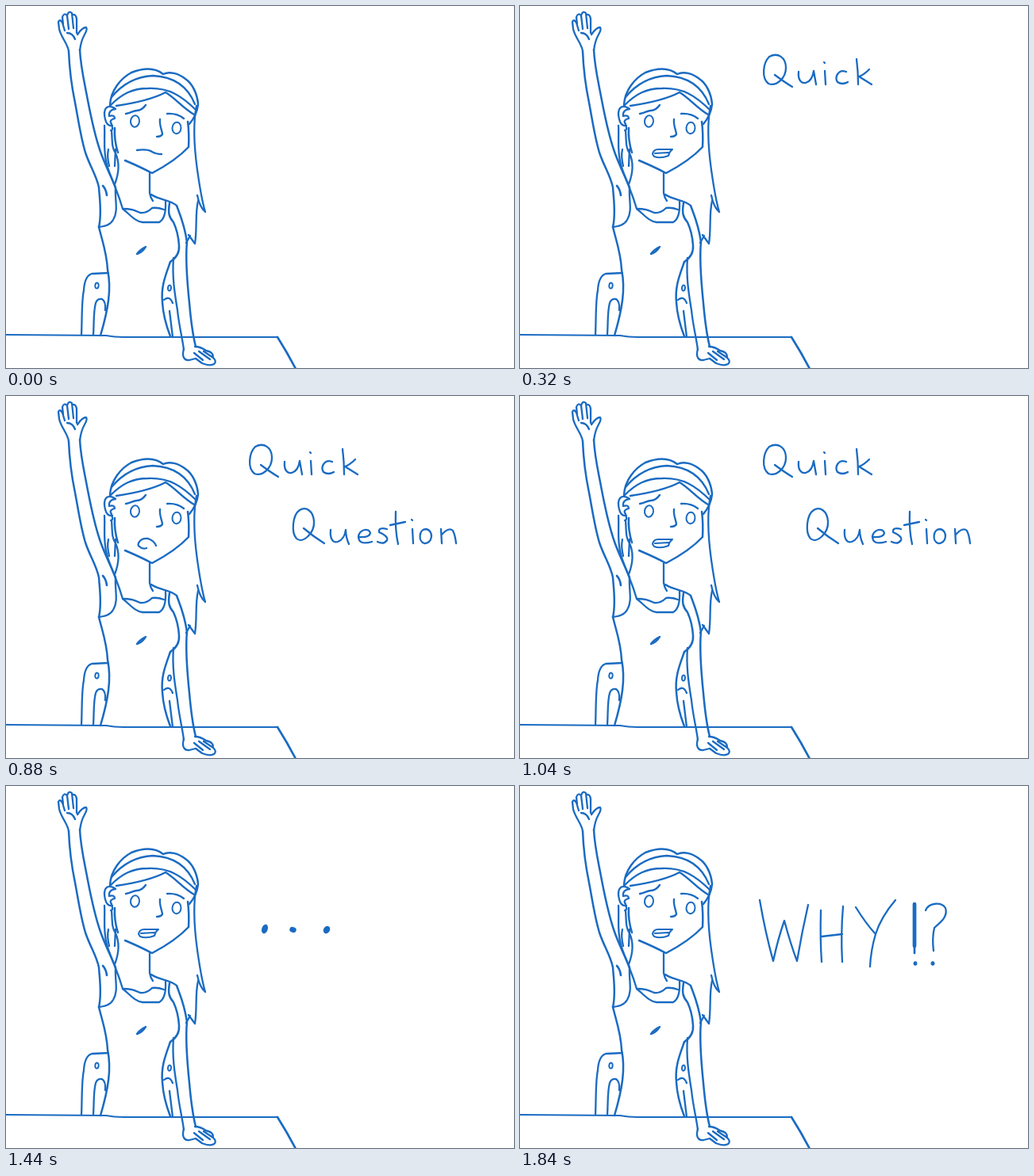
These frames come from a looping animation (640x457 px, 1920 ms). An HTML page with a canvas:

```html
<!DOCTYPE html>
<html lang="en">
<head>
<meta charset="utf-8">
<title>Quick Question</title>
<style>
  html, body { margin: 0; width: 100%; height: 100%; overflow: hidden; background: #fff; }
  canvas { display: block; width: 100vw; height: 100vh; }
</style>
</head>
<body>
<canvas id="stage" width="640" height="457" role="img" aria-label="Quick Question ... WHY!?"></canvas>
<script>
const ctx = document.getElementById('stage').getContext('2d');
const LOOP = 1920;
const INK = '#1a6bc2';

const stroke = (d, width = 2.3) => ({ path: new Path2D(d), width });

const dot = (x, y, rx, ry, tilt = 0) => {
  const path = new Path2D();
  path.ellipse(x, y, rx, ry, tilt, 0, Math.PI * 2);
  return { path, fill: true };
};

const ring = (x, y, rx, ry, tilt = 0) => ({ ...dot(x, y, rx, ry, tilt), fill: false, width: 2 });

const raisedArm = [
  stroke('M79 57 C78 48 69 39 67 29 L66 20 Q68 16 71 21 L74 31 M72 23 L71 14 Q73 8 77 12 L79 29 M77 12 Q79 5 83 9 L85 28 M84 11 Q88 10 89 16 L89 34 M90 36 Q96 27 101 27 Q103 29 99 36 C95 43 94 48 93 56 M77 34 Q84 34 87 42'),
  stroke('M79 57 C80 82 82 98 87 122 C91 143 94 165 100 185 C106 203 114 214 117 229 C118 244 121 262 117 279', 2.5),
  stroke('M93 55 C94 77 98 92 103 119 C108 145 112 164 119 184 C125 201 132 214 138 229', 2.5),
  stroke('M138 230 C137 245 142 259 135 270 C131 277 124 278 117 279'),
  stroke('M122 227 Q126 231 127 239', 2.6)
];

const hair = [
  stroke('M131 125 C132 106 145 91 158 84 C171 79 187 77 198 86 C206 82 217 85 226 92 C235 98 241 111 242 124 C241 134 236 143 231 149', 2.5),
  stroke('M133 115 C147 98 165 89 185 88 C208 89 228 99 238 124'),
  stroke('M132 125 C146 111 159 104 179 104 C205 103 221 113 240 132'),
  stroke('M201 109 C186 117 166 122 139 126 M201 109 C213 116 224 130 237 137', 2.5),
  stroke('M240 126 C235 151 237 178 241 207 C244 228 246 243 251 260 Q244 254 241 239'),
  stroke('M242 246 C238 263 241 281 238 300 L230 289 M232 290 L227 299'),
  stroke('M124 151 C125 167 122 182 127 200 C130 211 134 219 138 230'),
  stroke('M133 157 C134 170 133 179 138 186 C144 199 142 212 137 225 M129 181 Q127 190 130 202 M138 181 L137 202')
];

const face = [
  stroke('M137 154 Q136 169 141 185 M150 195 Q169 203 184 211 C201 202 216 193 230 178 Q231 161 229 146', 2.5),
  stroke('M137 129 C126 123 122 131 125 143 Q127 152 134 151 M138 130 Q129 131 130 139 Q137 137 137 142 Q129 144 133 149 M133 151 Q136 156 132 157'),
  stroke('M151 136 C158 135 160 132 165 132 Q171 132 176 125 M203 136 Q215 135 224 142', 2.4),
  stroke('M194 143 C193 151 197 158 197 162 Q195 165 190 165'),
  ring(162.5, 145.5, 5.5, 7.2, 0.12),
  ring(215, 154, 5.5, 7.2, 0.08)
];

const body = [
  stroke('M181 211 L181 236 Q182 242 185 246 M183 238 C195 246 207 244 215 252'),
  stroke('M138 230 C142 240 145 249 147 256 C155 262 162 272 172 273 L193 273 Q202 268 201 247'),
  stroke('M147 256 C158 256 162 258 169 261 Q177 262 184 255 Q191 254 199 257'),
  stroke('M206 249 C204 261 205 266 211 273 Q217 286 218 302 C219 313 213 319 207 323', 2.5),
  stroke('M215 252 C219 263 225 276 228 298 C226 318 228 346 231 375 C233 398 235 414 239 430', 2.5),
  stroke('M211 318 C209 343 213 365 216 384 C218 404 222 418 224 434'),
  stroke('M117 279 C121 296 127 311 128 333 C133 357 129 382 119 416', 2.5),
  stroke('M207 323 C201 340 195 354 197 374 C198 392 202 404 207 417', 2.5),
  stroke('M165 313 Q168 308 176 304 Q172 311 165 313', 2.4),
  stroke('M224 433 C221 443 225 448 231 447 L239 445 L247 451 Q257 455 262 452 Q266 449 261 444 Q262 437 252 435 Q245 430 238 430 M237 438 L248 447 M243 436 L257 446 M249 436 L261 444')
];

const furniture = [
  stroke('M95 415 C96 394 95 374 98 359 Q99 341 108 338 L129 337 M110 415 C111 400 110 386 113 375 Q115 369 121 370 Q126 373 125 384'),
  stroke('M199 371 Q206 365 210 375 M206 385 Q208 402 210 418'),
  ring(114.5, 353, 2.2, 3.6, 0.1),
  ring(206, 356, 2, 3.5, 0.1),
  stroke('M0 415 L126 416 Q136 418 148 418 L342 418', 2.2),
  stroke('M342 418 Q354 437 365 458', 2.7)
];

const scene = [...raisedArm, ...hair, ...face, ...body, ...furniture];

const mouths = {
  closed: [stroke('M165 182 Q178 180 184 184 Q189 187 196 187')],
  clenched: [stroke('M167 187 Q168 181 174 181 L192 181 Q188 184 187 189 Q177 193 169 190 Z M170 186 L187 185', 2.1)],
  open: [stroke('M189 182 Q177 183 172 180 Q163 184 168 190 Q173 195 182 194')],
  round: [stroke('M189 189 Q187 183 179 180 Q171 179 168 184 Q165 188 168 190 Q172 194 177 192')]
};

const quick = [
  stroke('M314 64 C306 72 304 91 313 98 C323 102 335 91 335 78 C335 65 325 58 314 64 M321 87 Q333 96 343 102'),
  stroke('M351 83 C350 93 354 98 360 97 C367 95 369 89 370 82 L373 99'),
  stroke('M384 82 L385 99 M383 71 L384 72'),
  stroke('M411 83 C401 79 396 90 400 96 Q406 100 413 96'),
  stroke('M424 67 Q426 82 426 99 M440 80 Q433 87 427 89 Q435 94 443 99')
];

const que = [
  stroke('M370 144 C361 150 359 172 366 180 C374 187 389 173 388 158 C387 145 378 139 370 144 M375 167 Q388 178 401 186'),
  stroke('M409 169 C408 179 411 186 418 184 C425 181 427 176 428 169 Q428 178 432 187'),
  stroke('M444 178 Q458 179 459 173 C457 166 446 168 444 177 Q444 189 461 184')
];

const stion = [
  stroke('M480 168 Q469 165 470 172 Q482 177 480 182 Q476 188 468 184'),
  stroke('M491 146 Q490 169 494 187 M484 163 L503 159'),
  stroke('M512 168 L513 186 M511 156 L512 157'),
  stroke('M529 168 C520 168 519 184 527 186 C537 187 540 170 529 168'),
  stroke('M548 168 L549 186 M549 175 Q558 165 563 170 Q566 176 567 186')
];

const dots = [
  dot(326, 180.5, 3.8, 6, 0.3),
  dot(361.5, 181.5, 4.3, 3.5, 0.3),
  dot(404, 181.5, 4, 5, 0.55)
];

const why = [
  stroke('M302 144 Q309 185 319 221 Q325 193 333 170 Q341 200 349 221 Q355 185 363 150'),
  stroke('M379 157 Q378 193 380 222 M407 152 Q404 187 406 222 M380 190 L406 187'),
  stroke('M423 153 Q436 174 448 187 M473 144 Q455 165 448 187 Q442 207 441 228'),
  stroke('M497 149 L497 202', 4.7),
  stroke('M497 202 L497 211', 2.7),
  dot(498, 224, 2.4, 2.8),
  stroke('M511 157 C515 147 531 146 536 154 C540 166 527 174 522 179 Q519 192 521 208'),
  dot(520, 224, 2.5, 2.8)
];

const question = [...quick, ...que, ...stion];

// Each cue holds until the next: start time, mouth, lettering.
const cues = [
  [0, 'closed', []],
  [80, 'round', quick],
  [240, 'open', quick],
  [320, 'clenched', quick],
  [480, 'round', [...quick, ...que]],
  [640, 'open', [...quick, ...que]],
  [720, 'clenched', question],
  [880, 'round', question],
  [1040, 'clenched', question],
  [1120, 'clenched', dots.slice(0, 1)],
  [1280, 'clenched', dots.slice(0, 2)],
  [1440, 'clenched', dots],
  [1600, 'round', why],
  [1680, 'open', why],
  [1840, 'clenched', why]
];

function draw({ path, width, fill }) {
  if (fill) return ctx.fill(path);
  ctx.lineWidth = width;
  ctx.stroke(path);
}

function render(time) {
  const [, mouth, lettering] = cues.findLast(([start]) => start <= time);
  ctx.fillStyle = '#fff';
  ctx.fillRect(0, 0, 640, 457);
  ctx.fillStyle = ctx.strokeStyle = INK;
  ctx.lineCap = ctx.lineJoin = 'round';
  [...scene, ...mouths[mouth], ...lettering].forEach(draw);
}

const origin = performance.now();

function tick() {
  render((performance.now() - origin) % LOOP);
  requestAnimationFrame(tick);
}

tick();
</script>
</body>
</html>
```
